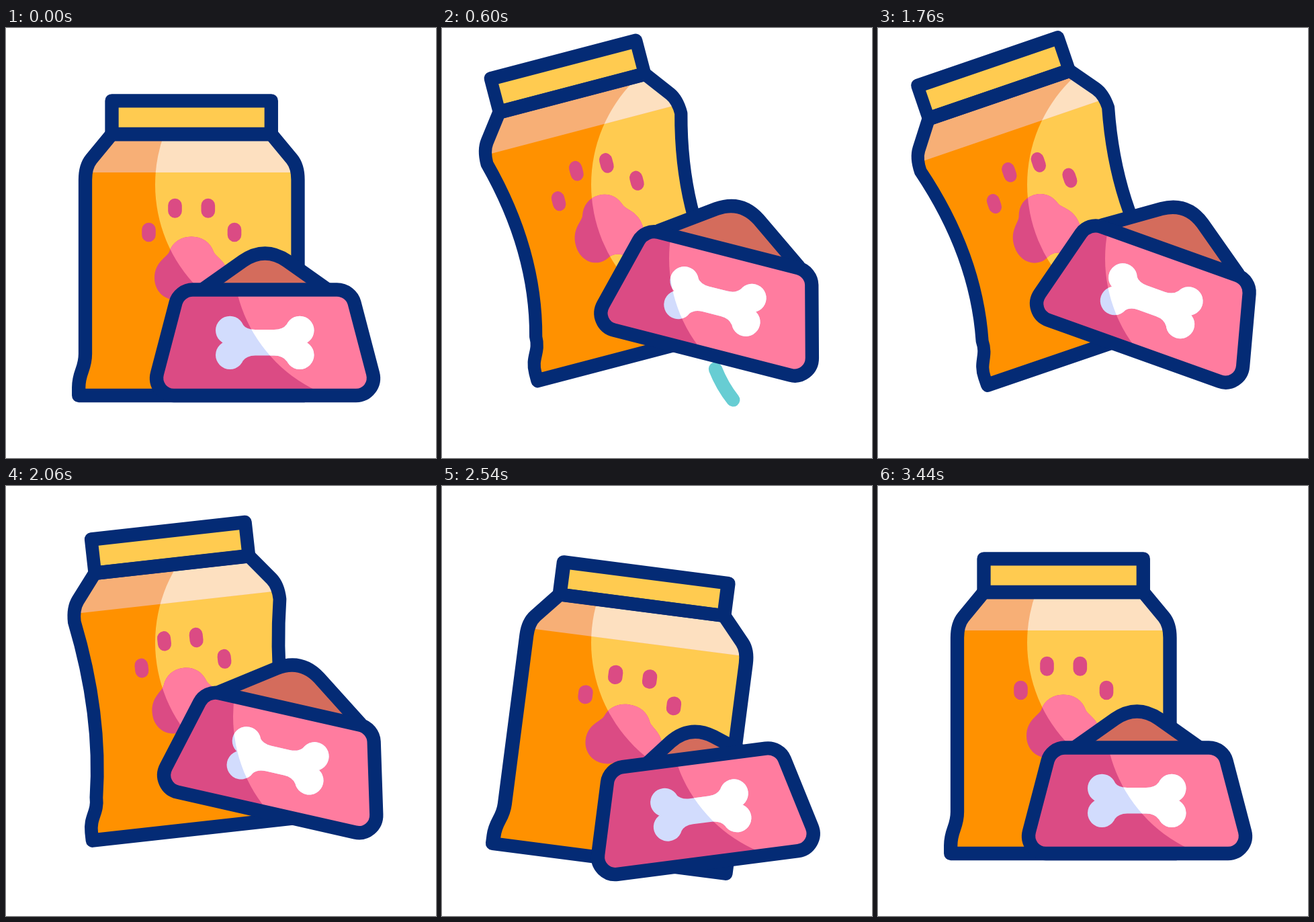
An HTML page with a canvas that plays this animation: 640x640 px, repeating every 3600 ms.

```html
<!DOCTYPE html>
<html lang="en">
<head>
<meta charset="utf-8">
<title>Pet food</title>
<style>
  html, body { margin: 0; width: 100%; height: 100%; overflow: hidden; background: #fff; }
  canvas { display: block; width: 100vw; height: 100vh; }
</style>
</head>
<body>
<canvas id="stage" width="640" height="640"></canvas>
<script>
const ctx = document.getElementById('stage').getContext('2d');
const LOOP = 3600;
const NAVY = '#042b75', YELLOW = '#ffcb50', ORANGE = '#ff9100';
const PINK = '#ff7c9f', ROSE = '#db4b84', FOOD = '#d46c5c', TEAL = '#67cdd3';

// Key poses as [time, tilt]; everything else follows from the tilt
const bagTilt = [[120, 0], [520, 14.2], [1320, 17], [1860, 19], [2060, 6.4], [2660, -8.2], [2950, 1], [3360, 0]];
const bowlTilt = [[120, 0], [520, 13.9], [1320, 16.6], [1880, 20], [2060, 12.8], [2680, -9.3], [3020, 0.6], [3400, 0]];

const clamp = u => Math.max(0, Math.min(1, u));

// Smooth curve through the keys without overshoot
function sample(keys, t) {
  const last = keys.length - 1;
  if (t <= keys[0][0]) return keys[0][1];
  if (t >= keys[last][0]) return keys[last][1];
  const i = keys.findIndex(k => k[0] >= t) - 1;
  const secant = k => (keys[k + 1][1] - keys[k][1]) / (keys[k + 1][0] - keys[k][0]);
  const slope = k => {
    if (k === 0 || k === last) return 0;
    const a = secant(k - 1), b = secant(k);
    return a * b > 0 ? 2 * a * b / (a + b) : 0;
  };
  const [t0, v0] = keys[i], [t1, v1] = keys[i + 1];
  const h = t1 - t0, u = (t - t0) / h, ease = u * u * (3 - 2 * u);
  return v0 + (v1 - v0) * ease
    + h * u * (1 - u) * (slope(i) * (1 - u) - slope(i + 1) * u);
}

// Tilting back lifts an object up to a limit; tilting forward lets it sink
const MAX_RISE = 62;
const riseOf = tilt => tilt > 0
  ? MAX_RISE * (1 - (1 - clamp(tilt / 16)) ** 2)
  : -0.26 * tilt * tilt;

// Highlights stay still while the objects move through them
const bagLight = [440, 233, 218];
const bowlLight = [556, 343, 218];

function shade(path, dark, light, [x, y, r]) {
  ctx.fillStyle = dark;
  ctx.fill(path);
  ctx.save();
  ctx.clip(path);
  ctx.resetTransform();
  ctx.beginPath();
  ctx.arc(x, y, r, 0, 7);
  ctx.fillStyle = light;
  ctx.fill();
  ctx.restore();
}

function outline(path, color = NAVY, width = 20.3) {
  ctx.strokeStyle = color;
  ctx.lineWidth = width;
  ctx.stroke(path);
}

// Turns and scales around a centre that is moved by dx, dy
function place(cx, cy, dx, dy, degrees, sx = 1, sy = 1) {
  ctx.translate(cx + dx, cy + dy);
  ctx.rotate(degrees * Math.PI / 180);
  ctx.scale(sx, sy);
  ctx.translate(-cx, -cy);
}

const cap = new Path2D('M157.5 108.3H394.8V158.2H157.5Z');
const pad = new Path2D(`M276 310.5C292 310.5 304 319 309 333C312 341 331 348 331 372
  C331 391 317 404.5 300 404.5C288 404.5 286 399 276 399S264 404.5 252 404.5
  C235 404.5 221 391 221 372C221 348 240 341 243 333C248 319 260 310.5 276 310.5Z`);
const toes = new Path2D('M212.5 300V308M251.5 264V272.5M300.8 264V272.5M340 300V308');

const bagBand = y => new Path2D(`M157.5 158L127 195Q118 206 118 ${y}
  H434.5Q434 206 425.5 195L394.8 158Z`);

function bagBody(pinch) {
  const waist = 2 * pinch, foot = 0.27 * pinch;
  return new Path2D(`M157.5 158L127 195Q118 206 118 226
    Q${118 + waist} 365 ${118 + foot} 485C${118 + foot} 508 108.2 512 108.2 535V547
    H444.2V535C444.2 512 ${434.5 - foot} 508 ${434.5 - foot} 485
    Q${434.5 - waist} 365 434.5 226Q434.5 206 425.5 195L394.8 158Z`);
}

const mound = new Path2D('M278 399.5L353 346.5Q385.5 324.5 418 346.5L493 399.5');
const bowl = new Path2D(`M278 389.5H492.5C505 389.5 515.5 398 518.5 409L546 514
  C550.5 531 538 547 521 547H250C233 547 220.5 531 225 514L252.5 409
  C255.5 398 266 389.5 278 389.5Z`);

const bone = new Path2D(`M333 450L352 441Q358 449 371 449H399Q412 449 418 441L437 450V487
  L418 496Q412 487.5 399 487.5H371Q358 487.5 352 496L333 487Z`);
for (const x of [333.3, 437.2])
  for (const y of [450, 486.7]) {
    const lobe = new Path2D();
    lobe.arc(x, y, 21.3, 0, 7);
    bone.addPath(lobe);
  }

const dash = new Path2D('M399 483Q410 526 437 558');
const DASH_LENGTH = 85;

function drawDash(t) {
  const tip = 1 - (1 - clamp((t - 440) / 220)) ** 2;
  const u = clamp((t - 500) / 260);
  const tail = u < 0.5 ? 2 * u * u : 1 - 2 * (1 - u) ** 2;
  if (tip - tail < 0.01) return;
  ctx.setLineDash([(tip - tail) * DASH_LENGTH, 500]);
  ctx.lineDashOffset = -tail * DASH_LENGTH;
  outline(dash, TEAL);
  ctx.setLineDash([]);
}

function drawBag(t) {
  const tilt = sample(bagTilt, t), rise = riseOf(tilt);
  const raised = clamp(rise / MAX_RISE);
  const widen = -0.0049 * tilt + 0.00007 * tilt * tilt;
  const pinch = 20.5 * raised;
  const body = bagBody(pinch);
  ctx.save();
  place(276, 328, -39 * raised ** 3, -rise, -tilt, 1 + widen, 1 - 0.55 * widen);
  shade(body, ORANGE, YELLOW, bagLight);
  shade(bagBand(215 - 0.1 * pinch), '#f7af76', '#fde0c0', bagLight);
  shade(pad, ROSE, PINK, bagLight);
  outline(toes, ROSE, 20.6);
  ctx.fillStyle = YELLOW;
  ctx.fill(cap);
  outline(body);
  outline(cap);
  ctx.restore();
}

function drawBowl(t) {
  const tilt = sample(bowlTilt, t), rise = riseOf(tilt);
  ctx.save();
  place(385.5, 468, 22 * clamp(rise / MAX_RISE) ** 3, -rise, tilt);
  ctx.save();
  ctx.translate(0, rise > 0 ? -rise / 5 : -rise * 1.1);
  ctx.fillStyle = FOOD;
  ctx.fill(mound);
  outline(mound);
  ctx.restore();
  shade(bowl, ROSE, PINK, bowlLight);
  shade(bone, '#d2dcfd', '#fff', bowlLight);
  outline(bowl);
  ctx.restore();
}

function frame() {
  const t = performance.now() % LOOP;
  ctx.fillStyle = '#fff';
  ctx.fillRect(0, 0, 640, 640);
  drawDash(t);
  drawBag(t);
  drawBowl(t);
  requestAnimationFrame(frame);
}

ctx.lineJoin = ctx.lineCap = 'round';
frame();
</script>
</body>
</html>
```
